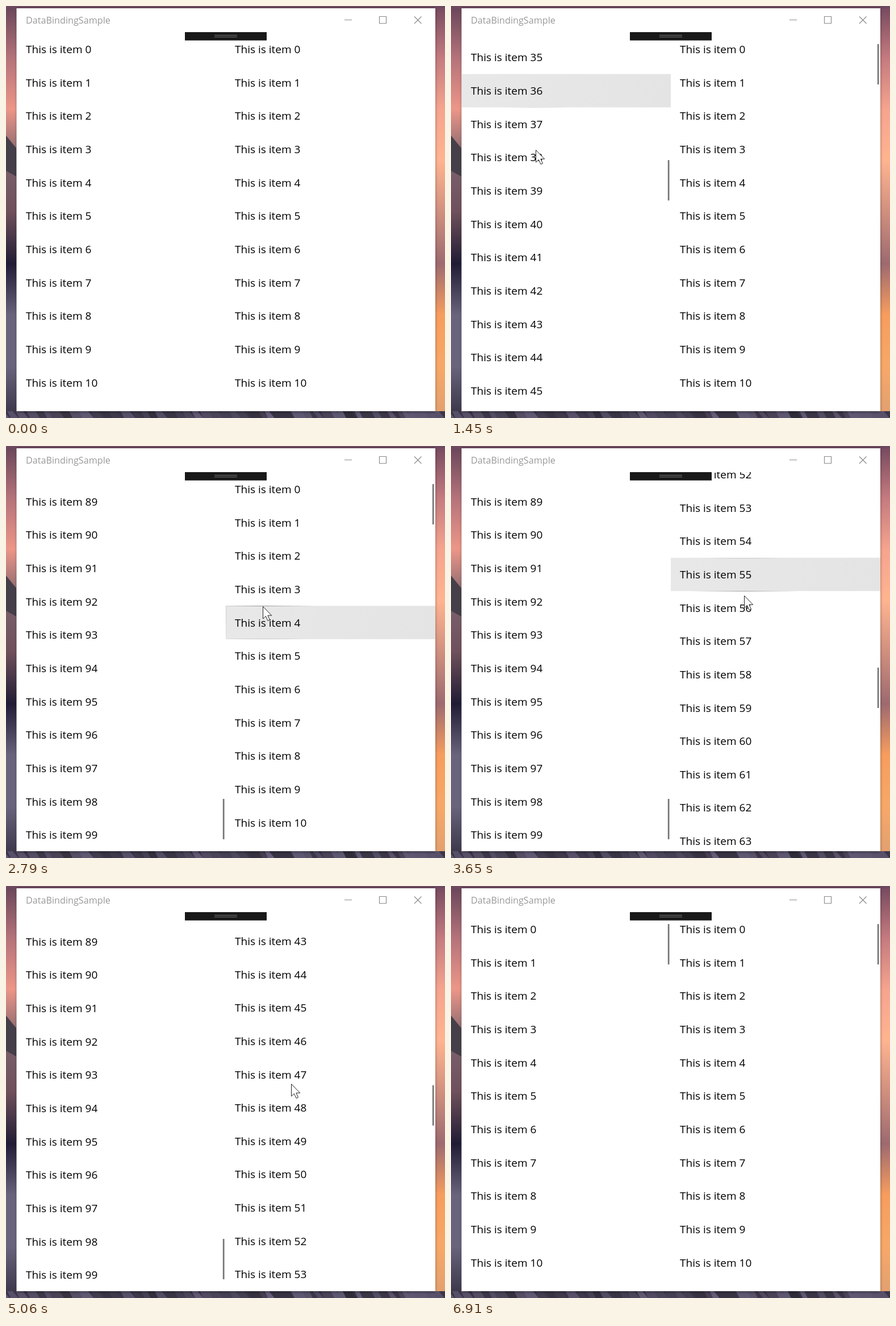
An HTML page with a canvas for the animation above (7.62 s loop, 773 by 725 pixels).

```html
<!DOCTYPE html>
<html lang="en">
<head>
<meta charset="utf-8">
<title>DataBindingSample</title>
<style>
html, body { margin: 0; width: 100%; height: 100%; overflow: hidden; }
canvas { display: block; }
</style>
</head>
<body>
<canvas id="stage" width="773" height="725"></canvas>
<script>
const ctx = document.getElementById('stage').getContext('2d');
const LOOP = 7620, ROW = 58.65, TOP = 46, BOTTOM = 713, MAX = 5198;
const FIRST = 46.7;   // top of row 0 before scrolling
const SETTLE = 90;    // hover refreshes this long after a flick ends
const LAG = 70;       // the thumb trails the content
const FONT = '"Open Sans", "Noto Sans", sans-serif';

const flick = (at, ms, to) => ({ at, ms, to });
const move = (at, ms, x, y) => ({ at, ms, x, y });

const lists = [
  { x: 19, w: 368, shown: 450, flicks: [flick(690, 680, 1914), flick(1370, 690, 5040),
    flick(2070, 180, MAX), flick(5850, 120, 5055), flick(5990, 490, 0)] },
  { x: 387, w: 369, shown: 70, flicks: [flick(3190, 400, 3031), flick(3600, 600, MAX),
    flick(4740, 320, 2501), flick(5070, 430, 0)] }
];
const flicks = lists.flatMap(list => list.flicks);
const moves = [move(70, 600, 149, 253), move(2440, 180, 250, 344), move(2640, 150, 452, 282),
  move(2790, 200, 516, 263), move(3700, 500, 502, 348), move(5780, 70, 238, 410),
  move(6720, 120, 470, 622)];

const clamp = u => Math.min(1, Math.max(0, u));
const glide = u => u * u * (3 - 2 * u);
const inertia = u => 1 - (1 - u * u) ** 3;

// Runs a value through each step in turn, from its start value
const follow = (steps, key, from, ease, t) =>
  steps.reduce((v, s) => v + (s[key] - v) * ease(clamp((t - s.at) / s.ms)), from);

const offset = (list, t) => follow(list.flicks, 'to', 0, inertia, t);
const cursorAt = t => ({ x: follow(moves, 'x', 470, glide, t), y: follow(moves, 'y', 700, glide, t) });
const cursorShown = t => t >= 70 && t < 6910;

function hovered(t) {
  if (!cursorShown(t)) return null;
  const run = flicks.filter(f => t >= f.at && t < f.at + f.ms + SETTLE).pop();
  const at = run ? run.at : t;
  const p = cursorAt(at);
  const list = lists[p.x < 387 ? 0 : 1];
  return { list, item: Math.floor((p.y - FIRST + offset(list, at)) / ROW) };
}

function rect(color, x, y, w, h) {
  ctx.fillStyle = color;
  ctx.fillRect(x, y, w, h);
}

function shape(color, points) {
  ctx.fillStyle = color;
  ctx.beginPath();
  points.forEach(p => ctx.lineTo(p[0], p[1]));
  ctx.closePath();
  ctx.fill();
}

// Evenly spaced vertical gradient
function shade(x, w, colors) {
  const g = ctx.createLinearGradient(0, 0, 0, 725);
  colors.forEach((c, i) => g.addColorStop(i / (colors.length - 1), c));
  rect(g, x, 0, w, 725);
}

function drawBackdrop() {
  shade(0, 400, ['#68455a', '#b4727a', '#ec9688', '#7a626c', '#6f505c', '#211c35',
    '#69637c', '#69637c', '#393347']);
  shade(400, 373, ['#75495f', '#c47a7f', '#f5a48e', '#ffb490', '#d0907f', '#9d6a70',
    '#f79d5e', '#f7a868', '#e0a070']);
  shape('#453f49', [[0, 228], [18, 250], [18, 300], [0, 290]]);
  rect('#6d4960', 0, 0, 773, 4);
  rect('#3b3548', 0, 713, 773, 12);
  let seed = 7;
  const rand = () => (seed = seed * 16807 % 2147483647) / 2147483647;
  for (let x = -10; x < 770; x += 8 + rand() * 14) {
    const w = 6 + rand() * 18;
    shape(`hsl(257, 13%, ${20 + rand() * 22}%)`, [[x, 713], [x + w, 713], [x + w + 10, 725], [x + 6, 725]]);
  }
}

function drawWindow() {
  ctx.save();
  ctx.shadowColor = 'rgba(0,0,0,.5)';
  ctx.shadowBlur = 5;
  ctx.shadowOffsetY = 1;
  rect('#fff', 18.5, 4, 737.5, 709);
  ctx.restore();
  ctx.font = '16.2px ' + FONT;
  ctx.fillStyle = '#999';
  ctx.fillText('DataBindingSample', 35, 31);
  ctx.strokeStyle = '#8c8c8c';
  ctx.lineWidth = 1.2;
  ctx.beginPath();
  ctx.moveTo(596, 24.5); ctx.lineTo(609, 24.5);
  ctx.rect(657.5, 18.5, 12, 12);
  ctx.moveTo(719, 18.5); ctx.lineTo(731.5, 31);
  ctx.moveTo(731.5, 18.5); ctx.lineTo(719, 31);
  ctx.stroke();
}

function drawHover(list, y, p) {
  const fill = ctx.createLinearGradient(list.x, 0, list.x + list.w, 0);
  fill.addColorStop(0, '#e8e8e8');
  fill.addColorStop(1, '#e4e4e4');
  rect(fill, list.x, y, list.w, ROW);
  const glow = ctx.createRadialGradient(p.x, p.y, 0, p.x, p.y, 95);
  glow.addColorStop(0, 'rgba(0,0,0,.38)');
  glow.addColorStop(1, 'rgba(0,0,0,0)');
  ctx.strokeStyle = glow;
  ctx.lineWidth = 1;
  ctx.strokeRect(list.x + .5, Math.round(y) + .5, list.w - 1, 58);
}

function drawList(list, t, hover) {
  const s = offset(list, t);
  ctx.save();
  ctx.beginPath();
  ctx.rect(list.x, TOP, list.w, BOTTOM - TOP);
  ctx.clip();
  ctx.font = '19px ' + FONT;
  const first = Math.max(0, Math.floor(s / ROW) - 1);
  for (let i = first; i < Math.min(100, first + 14); i++) {
    const y = FIRST + i * ROW - s;
    if (hover && hover.list === list && hover.item === i) drawHover(list, y, cursorAt(t));
    ctx.fillStyle = '#000';
    ctx.fillText('This is item ' + i, list.x + 16, Math.round(y + 36.3));
  }
  if (t >= list.shown) {
    const y = 67 + 554 * offset(list, t - LAG) / MAX;
    rect('#757575', list.x + list.w - 5.2, y, 2.7, 71);
  }
  ctx.restore();
}

function drawCursor({ x, y }) {
  ctx.save();
  ctx.translate(Math.round(x) + .5, Math.round(y) + .5);
  shape('#fff', [[0, 0], [0, 21.5], [4.8, 17], [8.6, 25], [12, 23.5], [8.4, 15.7], [15.2, 15.7]]);
  ctx.strokeStyle = '#222';
  ctx.lineWidth = 1;
  ctx.stroke();
  ctx.restore();
}

function draw(now) {
  const t = Math.floor(now % LOOP / 10) * 10;
  drawBackdrop();
  drawWindow();
  const hover = hovered(t);
  lists.forEach(list => drawList(list, t, hover));
  rect('#191919', 315, 46, 144, 14.6);
  rect('#777', 367, 51, 40, 1);
  rect('#777', 367, 54, 40, 1);
  if (cursorShown(t)) drawCursor(cursorAt(t));
}

const start = performance.now();
function loop() {
  draw(performance.now() - start);
  requestAnimationFrame(loop);
}
draw(0);
requestAnimationFrame(loop);
</script>
</body>
</html>
```
